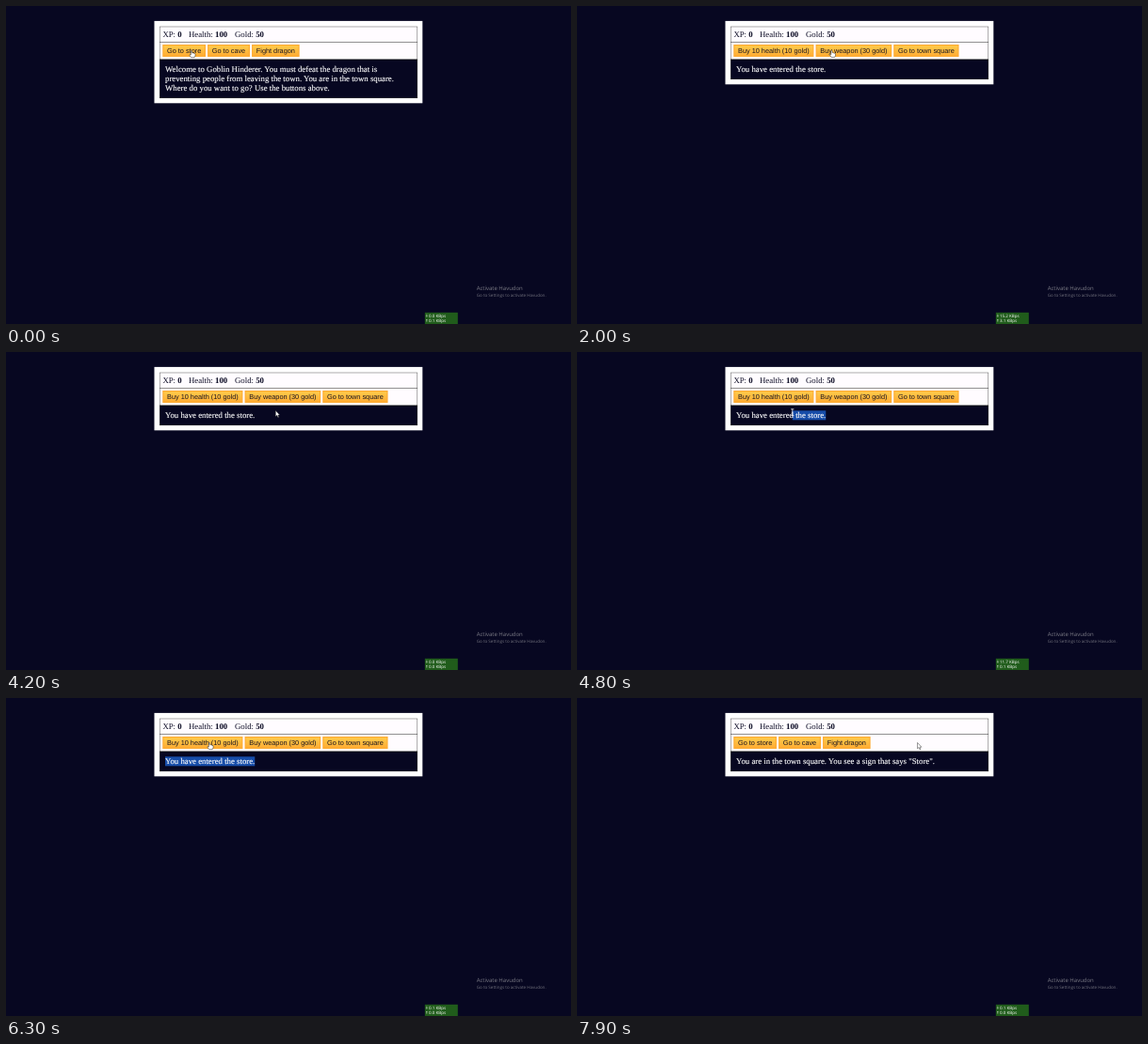
Animation of 600 by 338 pixels, one loop 8 s. Source, as an HTML page:

```html
<!DOCTYPE html>
<html lang="en">
<head>
<meta charset="utf-8">
<title>Text adventure</title>
<style>
  html, body { margin: 0; width: 100%; height: 100%; overflow: hidden; background: #070721; }
  svg { display: block; width: 600px; height: 338px; }
  text { text-rendering: geometricPrecision; white-space: pre; }
  .serif { font: 8.78px "Liberation Serif", serif; }
  .button { font: 7.32px "Liberation Sans", sans-serif; fill: #17141f; }
  .story { fill: #fff; stroke: #fff; stroke-width: .12px; }
  .ui { font-family: "Open Sans", sans-serif; }
</style>
</head>
<body>
<svg viewBox="0 0 600 338">
  <defs>
    <linearGradient id="gold" x2="0" y2="1">
      <stop stop-color="#fecc4c"/><stop offset="1" stop-color="#ffac33"/>
    </linearGradient>
  </defs>
  <rect width="600" height="338" fill="#070721"/>
  <rect id="panel" x="157.5" y="15.9" width="284.8" fill="#fff"/>
  <g fill="#fffcff" stroke="#444" stroke-width=".44">
    <rect x="163.3" y="22" width="273.5" height="16.2"/>
    <rect x="163.3" y="38.6" width="273.5" height="18.2"/>
    <rect id="story" x="163.3" y="57" width="273.5" fill="#070721" stroke="#000"/>
  </g>
  <g class="serif" fill="#0a0a23">
    <text x="166.4" y="33">XP: <tspan font-weight="bold">0</tspan></text>
    <text x="194" y="33">Health: <tspan font-weight="bold">100</tspan></text>
    <text x="243" y="33">Gold: <tspan font-weight="bold">50</tspan></text>
  </g>
  <g id="pages"></g>
  <g class="ui" fill="#7c7c86">
    <text x="499.7" y="302.3" font-size="6">Activate Havudon</text>
    <text x="499.7" y="308.6" font-size="4.52" fill="#72727d">Go to Settings to activate Havudon.</text>
  </g>
  <rect x="444.8" y="325.8" width="35" height="12.2" fill="#205c1b"/>
  <g class="ui" font-size="4.5" fill="#fff">
    <path d="M446.8 327.6v2.6M446.2 329.4l.6.8l.6-.8M446.8 335.8v-2.6M446.2 334l.6-.8l.6.8" fill="none" stroke="#e4ece2" stroke-width=".5"/>
    <text id="down" x="449" y="330.5"></text>
    <text id="up" x="449" y="336.1"></text>
  </g>
  <g id="cursor">
    <path id="arrow" d="M0 0V6.3L1.5 5L2.5 7.3L3.5 6.9L2.5 4.7H4.4Z" fill="#fff" stroke="#222" stroke-width=".45"/>
    <path id="hand" d="M-.7 .5Q0-.5 .7 .5V2.5Q1.4 2.1 1.9 2.7Q2.6 2.4 3 3Q3.8 2.8 4 3.7V5.3L3.2 7.2H-.4L-2.2 4.6Q-2.1 3.5-.7 4.5Z" fill="#fff" stroke="#222" stroke-width=".5"/>
    <path id="beam" d="M-1.6-3.4H1.6M0-3.4V3.4M-1.6 3.4H1.6" fill="none" stroke="#fff" stroke-width=".7"/>
  </g>
</svg>
<script>
const LOOP = 8000, STEP = 100;
const TEXT_LEFT = 169, LINE_HEIGHT = 10, LINE_TOP = 62.3;
const BUTTON_LEFT = 166.3, BUTTON_TOP = 41, BUTTON_HEIGHT = 13, BUTTON_PADDING = 4.75, BUTTON_GAP = 2.1;
const $ = id => document.getElementById(id);

function add(parent, tag, attrs, content = "") {
  const el = document.createElementNS("http://www.w3.org/2000/svg", tag);
  for (const name in attrs) el.setAttribute(name, attrs[name]);
  el.textContent = content;
  return parent.appendChild(el);
}

// Lays the buttons out in a row, each as wide as its label.
function addButtons(parent, labels) {
  let x = BUTTON_LEFT;
  return labels.map(label => {
    const box = add(parent, "rect", {
      x: x + .6, y: BUTTON_TOP + .6, height: BUTTON_HEIGHT - 1.2,
      fill: "url(#gold)", stroke: "#feac32", "stroke-width": 1.2
    });
    const text = add(parent, "text", { class: "button", x: x + BUTTON_PADDING, y: 50 }, label);
    const width = text.getComputedTextLength() + 2 * BUTTON_PADDING;
    box.setAttribute("width", width - 1.2);
    const button = { left: x, right: x + width };
    x = button.right + BUTTON_GAP;
    return button;
  });
}

function makePage(start, labels, lines) {
  const group = add($("pages"), "g", {});
  const buttons = addButtons(group, labels);
  const selection = add(group, "rect", { y: LINE_TOP, height: LINE_HEIGHT, width: 0, fill: "#164ca8" });
  const ends = lines.map((line, i) => TEXT_LEFT + add(group, "text", {
    class: "serif story", x: TEXT_LEFT, y: 70.2 + i * LINE_HEIGHT
  }, line).getComputedTextLength());
  return { start, group, buttons, selection, ends };
}

const squareLabels = ["Go to store", "Go to cave", "Fight dragon"];
const storeLabels = ["Buy 10 health (10 gold)", "Buy weapon (30 gold)", "Go to town square"];
const square = makePage(0, squareLabels, [
  "Welcome to Goblin Hinderer. You must defeat the dragon that is",
  "preventing people from leaving the town. You are in the town square.",
  "Where do you want to go? Use the buttons above."
]);
const store = makePage(1100, storeLabels, ["You have entered the store."]);
const signpost = makePage(7600, squareLabels, ['You are in the town square. You see a sign that says "Store".']);
const pages = [square, store, signpost];

const spots = {
  first: [197, 47.5], second: [270.5, 47.2], third: [361.5, 47.5],
  lineEnd: [403, 81], margin: [177.5, 53.5],
  afterText: [286.3, 62.3], textStart: [171.2, 66]
};

// start, duration, destination
const moves = [
  [0, 300, "lineEnd"], [400, 500, "margin"], [1000, 100, "first"], [1500, 500, "second"],
  [2000, 800, "third"], [3800, 400, "afterText"], [4400, 800, "textStart"],
  [5200, 500, "first"], [6200, 300, "second"], [6600, 600, "third"]
];

// Download and upload, renewed once a second
const traffic = ["0.0 0.1", "15.2 3.1", "0.3 0.1", "0.0 0.0", "11.7 0.1", "0.2 0.1", "0.1 0.0"];

const clamp = (v, low, high) => Math.max(low, Math.min(high, v));
const ease = k => k * k * (3 - 2 * k);

function pointerAt(t) {
  let [x, y] = spots.first;
  for (const [start, duration, name] of moves) {
    const k = ease(clamp((t - start) / duration, 0, 1));
    x += (spots[name][0] - x) * k;
    y += (spots[name][1] - y) * k;
  }
  return [x, y];
}

function pointerKind(page, x, y) {
  const onRow = y > BUTTON_TOP && y < BUTTON_TOP + BUTTON_HEIGHT;
  if (onRow && page.buttons.some(b => x > b.left && x < b.right)) return "hand";
  const line = Math.floor((y - LINE_TOP) / LINE_HEIGHT);
  return x > TEXT_LEFT && x < page.ends[line] ? "beam" : "arrow";
}

function draw(t) {
  const page = pages.findLast(p => t >= p.start);
  for (const p of pages) p.group.style.display = p === page ? "" : "none";
  const extra = (page.ends.length - 1) * LINE_HEIGHT;
  $("panel").setAttribute("height", 67.4 + extra);
  $("story").setAttribute("height", 20.8 + extra);

  const [x, y] = pointerAt(t);
  const kind = pointerKind(page, x, y);
  $("cursor").setAttribute("transform", `translate(${x} ${y})`);
  for (const id of ["arrow", "hand", "beam"]) $(id).style.display = id === kind ? "" : "none";

  // Dragging leftwards selects the store text.
  const end = store.ends[0];
  const left = t < 4400 ? end : t < 5200 ? clamp(x, TEXT_LEFT, end) : TEXT_LEFT;
  store.selection.setAttribute("x", left);
  store.selection.setAttribute("width", end - left);

  const second = clamp(Math.floor((t - 250) / 1000), 0, traffic.length - 1);
  const [down, up] = traffic[second].split(" ");
  $("down").textContent = down + " KBps";
  $("up").textContent = up + " KBps";
}

const begin = performance.now();
function tick() {
  const t = (performance.now() - begin) % LOOP;
  draw(Math.floor(t / STEP) * STEP);
  requestAnimationFrame(tick);
}
tick();
</script>
</body>
</html>
```
